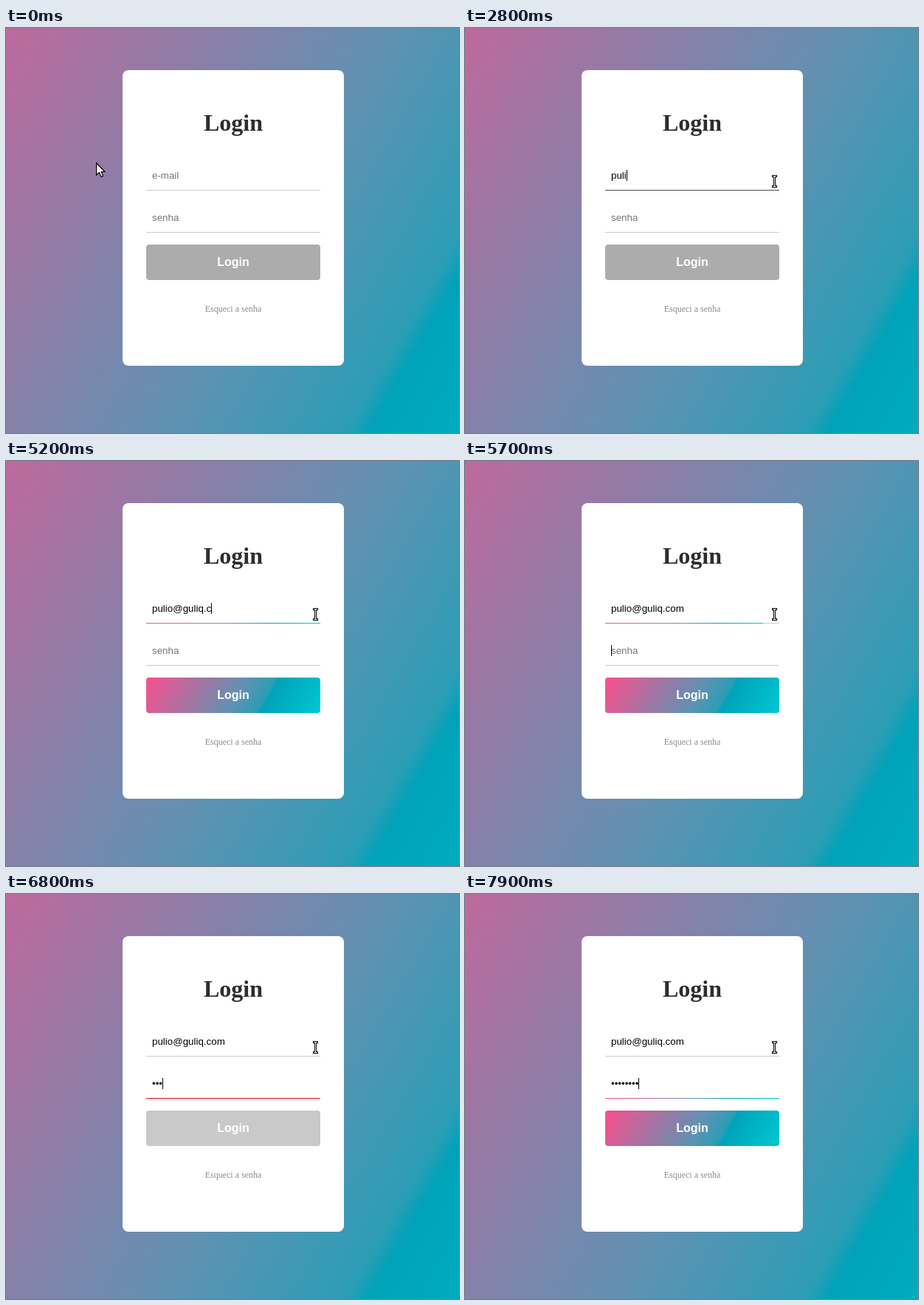
Write an HTML page that moves like this. It is 614 px wide and 548 px high and loops after 8 s.

```html
<!DOCTYPE html>
<html lang="pt">
<head>
<meta charset="utf-8">
<title>Login</title>
<style>
  html, body { margin: 0; width: 100%; height: 100%; overflow: hidden; }
  #stage {
    position: relative; width: 614px; height: 548px; overflow: hidden;
    background: linear-gradient(120deg, #fb4f8e -300px, #6191b2 455px, #2c9db6 672px, #00a3b9 699px, #00c8d1 1150px);
  }
  #stage * { position: absolute; box-sizing: border-box; margin: 0; white-space: pre; }
  .card { left: 158px; top: 57px; width: 300px; height: 400px; border-radius: 8px; background: #fff; }
  h1, .link { left: 158px; width: 300px; text-align: center; font-family: "Liberation Serif", serif; }
  h1 { top: 110px; font-size: 32px; line-height: 36px; color: #2d2d2d; }
  .link { top: 373px; font-size: 12px; line-height: 14px; color: #8b8b8b; }
  .field {
    left: 190px; width: 236px; height: 40px; border-bottom: 1px solid #ccc;
    font: 13.3333px/15px "Liberation Sans", sans-serif;
  }
  .text { left: 8px; top: 12px; }
  .caret { top: 12px; width: 1px; height: 15px; background: #000; }
  .line { left: 0; top: 39px; height: 1px; }
  .button {
    left: 190px; top: 293px; width: 236px; height: 48px; padding-top: 15px; border-radius: 4px;
    color: #fff; text-align: center; font: bold 16px/18px "Liberation Sans", sans-serif;
  }
  svg { left: 0; top: 0; overflow: visible; }
</style>
</head>
<body>
<div id="stage">
  <div class="card"></div>
  <h1>Login</h1>
  <div class="field" id="email" style="top:180px"><span class="text"></span><i class="caret"></i><i class="line"></i></div>
  <div class="field" id="password" style="top:237px"><span class="text"></span><i class="caret"></i><i class="line"></i></div>
  <div class="button" id="button">Login</div>
  <div class="link">Esqueci a senha</div>
  <svg width="1" height="1">
    <path id="arrow" d="M.6.8v16l3.8-3.4 2.6 5.8 2.6-1.1-2.5-5.6h4.8z" fill="#fff" stroke="#000" stroke-width="1.2"/>
    <g id="beam" fill="none" stroke-linecap="square">
      <path d="M-1.5-6.5h4M.5-6.5v14M-1.5 7.5h4" stroke="#000" stroke-width="3"/>
      <path d="M-1.5-6.5h4M.5-6.5v14M-1.5 7.5h4" stroke="#fff"/>
    </g>
  </svg>
</div>
<script>
const LOOP = 8000, STEP = 100;
const GRADIENT = 'linear-gradient(120deg, #fb4f8e, #6191b2 52%, #2c9db6 67%, #00a3b9 69%, #00c8d1)';
const ADDRESS = 'pulio@guliq.com';
// Time of each keystroke
const emailKeys = [2200, 2300, 2800, 2800, 3000, 3100, 4100, 4200, 4400, 4600, 4800, 5100, 5200, 5300, 5500];
const passwordKeys = [6500, 6700, 6800, 7000, 7300, 7300, 7400, 7900];
const emailFocus = 750, emailBlur = 5670, passwordFocus = 5700;
const emailValid = 5200, passwordShort = 6500, passwordValid = 7900;

const $ = id => document.getElementById(id);
const clamp = x => Math.min(1, Math.max(0, x));
const mix = (a, b, k) => a + (b - a) * k;
const within = (t, a, b) => t >= a && t < b;
const typed = (keys, t) => keys.filter(k => k <= t).length;

// CSS "ease": cubic-bezier(.25, .1, .25, 1)
function ease(x) {
  x = clamp(x);
  const curve = (s, a, b) => 3 * s * (1 - s) ** 2 * a + 3 * s * s * (1 - s) * b + s ** 3;
  let low = 0, high = 1;
  for (let i = 0; i < 20; i++) {
    const s = (low + high) / 2;
    if (curve(s, .25, .25) < x) low = s; else high = s;
  }
  return curve(high, .1, 1);
}

function drawField(id, value, placeholder, caretOn, lineWidth, lineFill) {
  const [text, caret, line] = $(id).children;
  text.textContent = value || placeholder;
  text.style.color = value ? '#000' : '#757575';
  caret.style.left = 8 + (value ? text.offsetWidth : 0) + 'px';
  caret.style.display = caretOn ? '' : 'none';
  line.style.width = 236 * lineWidth + 'px';
  line.style.background = lineFill;
}

function drawPointer(t) {
  const enter = clamp(t / 400), cross = clamp((t - 600) / 700);
  const slide = cross * cross * (3 - 2 * cross);
  const x = Math.round(mix(mix(122, 215, enter), 419, slide));
  const y = Math.round(mix(mix(182, 205, enter), 207, slide));
  const overField = x >= 190;
  for (const [id, shown] of [['arrow', !overField], ['beam', overField]]) {
    $(id).setAttribute('transform', `translate(${x} ${y})`);
    $(id).style.display = shown ? '' : 'none';
  }
}

function render(t) {
  const emailCaret = within(t, emailFocus, 1300) || within(t, 1800, 3700) || within(t, 4100, emailBlur);
  const emailLine = ease((t - emailFocus) / 300) - ease((t - emailBlur) / 300);
  drawField('email', ADDRESS.slice(0, typed(emailKeys, t)), 'e-mail', emailCaret,
    emailLine, t < emailValid ? '#504a55' : GRADIENT);

  const invalid = within(t, passwordShort, passwordValid);
  const red = `rgba(250, 0, 30, ${ease((t - passwordShort) / 300)})`;
  drawField('password', '•'.repeat(typed(passwordKeys, t)), 'senha',
    within(t, passwordFocus, 6300) || t >= passwordShort,
    ease((t - passwordFocus) / 300), invalid ? red : GRADIENT);

  const grey = t < emailValid ? 1 : ease((t - passwordShort) / 800);
  $('button').style.background =
    t < emailValid || invalid ? `rgba(172, 172, 172, ${grey})` : GRADIENT;
  drawPointer(t);
}

const start = performance.now();
function tick() {
  const t = (performance.now() - start) % LOOP;
  render(Math.floor(t / STEP) * STEP);
  requestAnimationFrame(tick);
}
tick();
</script>
</body>
</html>
```
